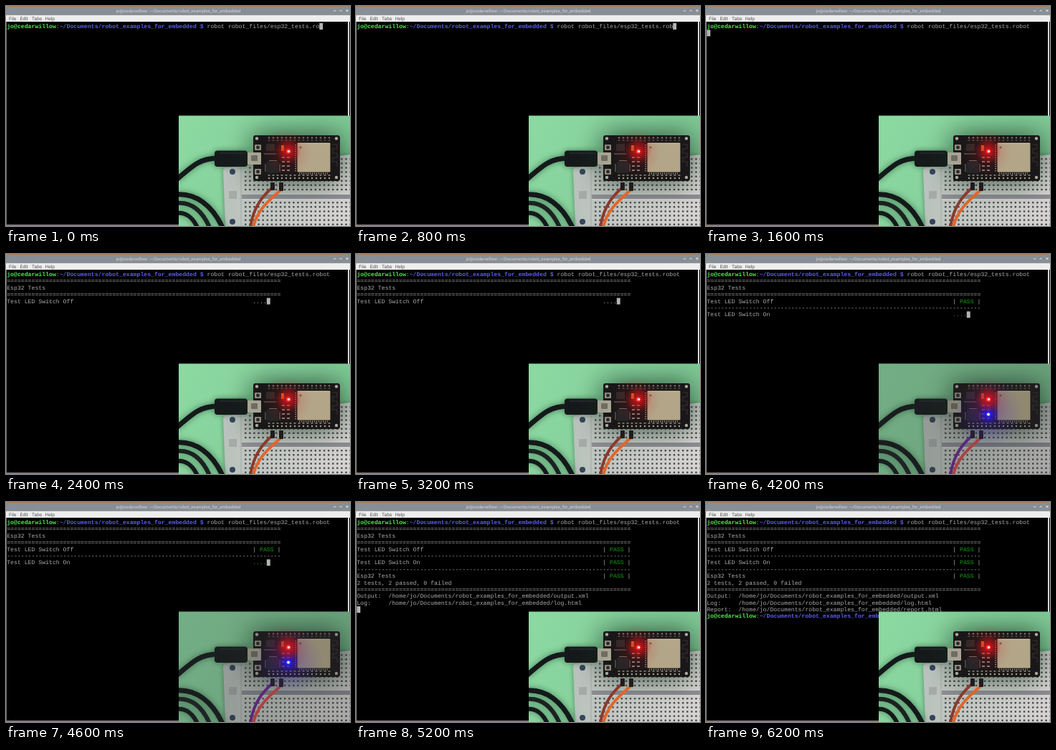
Recreate the animation shown at these times as an HTML page with a canvas. Size 480 by 308 pixels, loop 6400 ms.

```html
<!DOCTYPE html>
<html lang="en">
<head>
<meta charset="utf-8">
<title>Terminal test run</title>
<style>
html, body { margin: 0; width: 100%; height: 100%; overflow: hidden; background: #000; }
canvas { display: block; width: 480px; height: 308px; }
</style>
</head>
<body>
<canvas id="stage" width="480" height="308"></canvas>
<script>
const LOOP = 6400, CELL = 4.9, ROW = 9.39, LEFT = 1.2, TOP = 24;
const GREY = '#aaa', PASS = '#18a018', USER = '#50f050', PATH = '#5c5cec';
const ctx = document.getElementById('stage').getContext('2d');
const dir = '~/Documents/robot_examples_for_embedded';
const host = 'jo@cedarwillow';
const home = '/home/jo/Documents/robot_examples_for_embedded/';
const thick = '='.repeat(78) + '\n', thin = '-'.repeat(78) + '\n';
const back = '\b'.repeat(4);

// Terminal output: time, colour, text
const stream = [
  [0, USER, host], [0, GREY, ':'], [0, PATH, dir + ' $ '],
  [0, GREY, 'robot robot_files/esp32_tests.ro'],
  [600, GREY, 'b'], [1000, GREY, 'o'], [1200, GREY, 't'], [1400, GREY, '\n'],
  [2000, GREY, thick + 'Esp32 Tests\n' + thick + 'Test LED Switch Off'.padEnd(70) + '....'],
  ...result(3400, back), [3400, GREY, thin + 'Test LED Switch On'.padEnd(70)], [3400, PASS, '....'],
  ...result(5000, back), [5000, GREY, thin + 'Esp32 Tests'.padEnd(70)],
  ...result(5000, ''), [5000, GREY, '2 tests, 2 passed, 0 failed\n' + thick],
  [5000, GREY, `Output:  ${home}output.xml\n`],
  [5200, GREY, `Log:     ${home}log.html\n`],
  [5400, GREY, `Report:  ${home}report.html\n`],
  [5600, USER, host], [5600, GREY, ':'], [5600, PATH, dir + ' $ ']
];

function result(time, prefix) {
  return [[time, GREY, prefix + '| '], [time, PASS, 'PASS'], [time, GREY, ' |\n']];
}

function rect(color, x, y, w, h, r = 0) {
  ctx.fillStyle = color;
  ctx.beginPath();
  ctx.roundRect(x, y, w, h, r);
  ctx.fill();
}

function dot(color, x, y, r) {
  ctx.fillStyle = color;
  ctx.beginPath();
  ctx.arc(x, y, r, 0, 7);
  ctx.fill();
}

function line(color, width, path) {
  ctx.strokeStyle = color;
  ctx.lineWidth = width;
  ctx.stroke(new Path2D(path));
}

function text(str, x, y, font, color) {
  ctx.font = font;
  ctx.fillStyle = color;
  ctx.fillText(str, x, y);
}

function glow(rgb, x, y, r, alpha) {
  const g = ctx.createRadialGradient(x, y, 0, x, y, r);
  g.addColorStop(0, `rgba(${rgb},${alpha})`);
  g.addColorStop(0.45, `rgba(${rgb},${alpha * 0.5})`);
  g.addColorStop(1, `rgba(${rgb},0)`);
  ctx.fillStyle = g;
  ctx.fillRect(x - r, y - r, 2 * r, 2 * r);
}

function shadow(color, blur) {
  ctx.shadowColor = color;
  ctx.shadowBlur = blur;
}

function drawWindow() {
  rect('#000', 0, 0, 480, 308);
  rect('#878e95', 0, 0, 480, 12.5);
  rect('#a58058', 0, 0, 480, 1);
  ctx.textAlign = 'center';
  text(`${host}: ${dir}`, 240.5, 8.8, '6.2px Roboto, sans-serif', '#d6d9dc');
  ctx.textAlign = 'left';
  line('#eee', 1, 'M457 6l1.6 1.6 1.6-1.6M465.6 7.4l1.6-1.6 1.6 1.6M474.6 5l3 3M477.6 5l-3 3');
  rect('#ededed', 0, 12.5, 480, 9.5);
  [['File', 4], ['Edit', 19.5], ['Tabs', 36], ['Help', 54.5]].forEach(([s, x]) =>
    text(s, x, 20, '6.6px Roboto, sans-serif', '#555'));
  rect('#d8d8d8', 477, 22, 2, 285);
  rect('#878e95', 0, 22, 0.8, 285);
  rect('#878e95', 0, 306, 480, 1);
  rect('#8c6a4c', 0, 307, 480, 1);
}

function drawTerminal(t) {
  const cells = new Map();
  let row = 0, col = 0;
  for (const [time, color, str] of stream) {
    if (time > t) break;
    for (const ch of str) {
      if (ch === '\n') { row++; col = 0; }
      else if (ch === '\b') col--;
      else cells.set(row * 100 + col++, [ch, color]);
    }
  }
  cells.forEach(([ch, color], key) => {
    const bold = color === USER || color === PATH ? 'bold ' : '';
    text(ch, LEFT + key % 100 * CELL, TOP + 7 + Math.floor(key / 100) * ROW,
      bold + '8.165px "Liberation Mono", monospace', color);
  });
  rect('#b4b4b4', LEFT + col * CELL, TOP + row * ROW, CELL, ROW - 0.4);
}

function drawBreadboard() {
  const g = ctx.createLinearGradient(303, 0, 480, 0);
  g.addColorStop(0, '#b9c2bc');
  g.addColorStop(1, '#d6d3d2');
  ctx.fillStyle = g;
  shadow('rgba(20,60,35,.5)', 6);
  ctx.fill(new Path2D('M303 231Q303 226 308 226L480 208V308H306Z'));
  shadow('transparent', 0);
  line('#a3aaa6', 1, 'M328 226V308');
  rect('#a5aca8', 311, 259, 11, 11);
  dot('#34455a', 316, 232, 4);
  dot('#34455a', 316, 302, 4);
  for (let x = 333; x < 480; x += 6.1) {
    for (let y = 213; y < 308; y += 6.1) {
      const onBoard = y > 260 - x * 0.104;
      const inGroove = y > 260 && y < 272;
      if (onBoard && !inGroove) rect('#4c4a4a', x, y, 2.5, 2.5, 0.7);
    }
  }
  rect('#8d8d92', 329, 264, 151, 6);
  line('#dddcdb', 1.2, 'M329 271H480');
}

function drawCables() {
  shadow('rgba(15,50,30,.55)', 8);
  line('#14191a', 7, 'M296 213C272 213 262 222 238 243');
  line('#14191a', 7, 'M238 264C264 262 288 278 303 312');
  line('#1b2221', 6, 'M238 276C258 274 274 286 285 312');
  line('#14191a', 6, 'M238 290C252 288 262 298 268 312');
  rect('#15181a', 291, 202.5, 46, 22.5, 4);
  shadow('transparent', 0);
  line('#32373a', 1, 'M298 206H333');
}

function drawBoard() {
  shadow('rgba(18,48,28,.85)', 38);
  rect('#17150f', 345, 181, 121, 64, 4);
  shadow('transparent', 0);
  rect('#1a1718', 345, 181, 121, 64, 4);
  for (const [x, y] of [[350, 185.5], [461, 185.5], [350, 240], [461, 240]])
    dot('#a8aaa0', x, y, 2.2);
  for (let i = 0; i < 15; i++) {
    const x = 367 + i * 6;
    dot('#7d7464', x, 184.5, 1.2);
    dot('#a9a08a', x, 241, 1.2);
    rect('#5d5852', x - 1.5, 187.5, 3, 1.2);
    rect('#7f7b74', x - 1.5, 236, 3, 1.8);
  }
  rect('#a7a493', 337, 205, 19, 17, 1);
  rect('#6f6d62', 342, 209, 9, 8, 1);
  for (const y of [194, 228]) {
    rect('#8f8c80', 347, y, 9, 8, 1);
    dot('#2b2928', 351.5, y + 4, 2.4);
  }
  rect('#2c2a2a', 363, 193, 12, 10);
  rect('#252527', 364, 218, 16, 16);
  line('#74706a', 1, 'M362 221V232M382 221V232M367 216.5H378M360 207H377');
  for (let i = 0; i < 8; i++)
    rect('#86807a', 385 + i % 2 * 7, 211 + (i >> 1) * 6, 4, 2);
  rect('#c98a2a', 384, 195, 4, 8);
  rect('#b3a688', 406.5, 191.5, 46, 41, 1);
  line('#cfc4a6', 1, 'M407 192.5H452');
  dot('#6a604c', 411, 198, 1.6);
  line('#35302c', 1.2, 'M456 194H462V200H456V206H462V212H456V218H462V225');
  ctx.setLineDash([1.3, 1.7]);
  line('#9a8f7c', 1.8, 'M404 194V232M409 234.5H449');
  ctx.setLineDash([]);
}

function drawPhoto(blue) {
  ctx.save();
  ctx.beginPath();
  ctx.rect(241, 153.5, 239, 154.5);
  ctx.clip();
  const bg = ctx.createLinearGradient(241, 154, 480, 260);
  bg.addColorStop(0, '#8cd9a2');
  bg.addColorStop(0.5, '#86d19c');
  bg.addColorStop(1, '#7cc592');
  ctx.fillStyle = bg;
  ctx.fillRect(241, 153, 239, 155);
  drawBreadboard();
  drawCables();
  drawBoard();
  line(blue ? '#6c2794' : '#8a3a2c', 4, 'M373 253C360 264 345 280 341 310');
  line(blue ? '#d94848' : '#e0662c', 4, 'M386 255C372 268 350 284 345 310');
  rect('#211c1e', 369, 247, 6, 11, 1);
  rect('#211c1e', 381, 247, 6, 12, 1);
  if (blue) {
    rect('rgba(40,45,45,.25)', 241, 153, 239, 155);
    glow('70,30,220', 394, 224, 48, 0.35);
    glow('20,20,255', 394, 224, 15, 1);
  }
  glow('200,20,25', 392, 205, 34, 0.3);
  glow('235,20,25', 394, 203, 18, 0.9);
  dot('#ff3038', 394, 203.5, 3.2);
  dot('#fff0ea', 394.5, 203.5, 1.8);
  if (blue) {
    dot('#2530ff', 394, 224.5, 3.6);
    dot('#f0f0ff', 394, 224.5, 2);
  }
  ctx.restore();
}

function draw() {
  const t = performance.now() % LOOP;
  drawWindow();
  drawTerminal(t);
  drawPhoto(t >= 3800 && t < 5000);
  requestAnimationFrame(draw);
}

ctx.textRendering = 'geometricPrecision';
draw();
</script>
</body>
</html>
```
